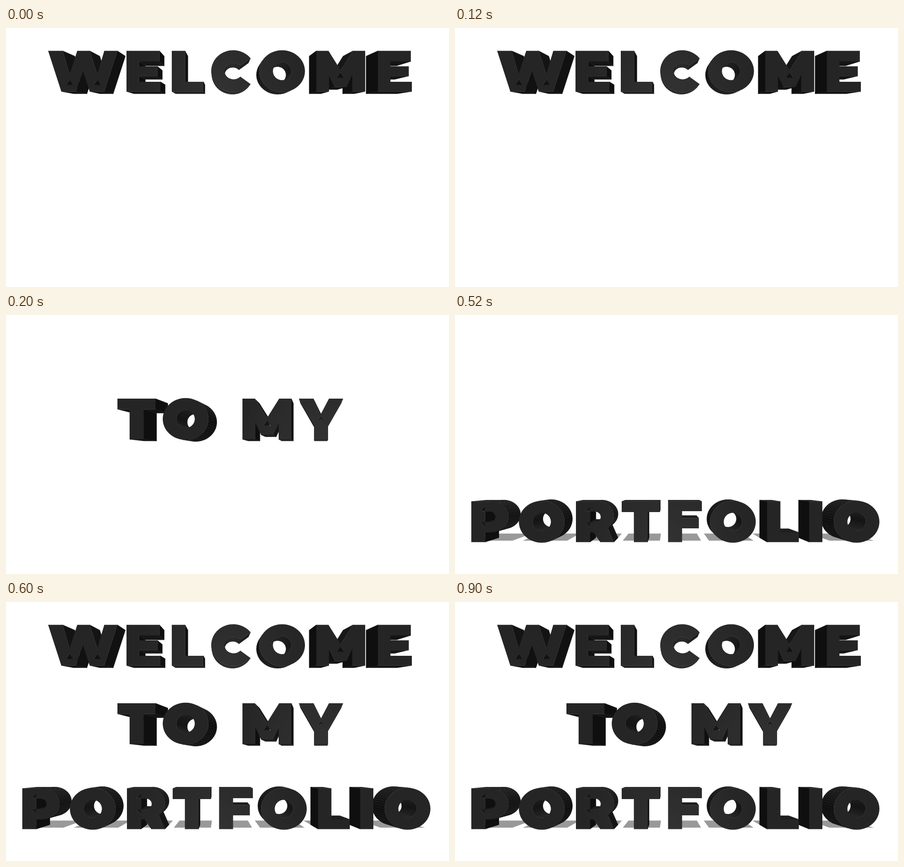
Recreate the animation shown at these times as an HTML page with a canvas. Size 978x573 px, loop 1.1 s.

```html
<!DOCTYPE html>
<html>
<head>
<meta charset="utf-8">
<title>Welcome to my portfolio</title>
<style>
html, body { margin: 0; height: 100%; overflow: hidden; background: #fff; }
canvas { display: block; }
</style>
</head>
<body>
<canvas id="stage" width="978" height="573"></canvas>
<script>
const ctx = document.getElementById('stage').getContext('2d');
const SIZE = 90;       // cap height
const DEPTH = 0.076;   // how far the backs shrink toward the vanishing point
const SHADOW = 0.147;  // how far the floor shadows reach
const SPACE = 50;

// Points along an ellipse, angles in degrees
function arc(cx, cy, rx, ry, from, to, steps = 48) {
  return Array.from({ length: steps + 1 }, (_, i) => {
    const a = (from + (to - from) * i / steps) * Math.PI / 180;
    return [cx + rx * Math.cos(a), cy + ry * Math.sin(a)];
  });
}
const pts = text => text.split(' ').map(p => p.split(',').map(Number));

// Left bearing, width, right bearing, then outlines in a 100 x 100 box:
// outer rings clockwise, holes reversed
const glyph = (left, width, right, ...rings) => ({ left, width, right, rings });
const bowlHoles = [
  [...pts('37,25 37,51'), ...arc(50, 38, 15, 13, 90, -90)],
  pts('37,11 24,23 37,25'),
  pts('37,51 24,52 37,64')
];
const glyphs = {
  W: glyph(6, 153, 6, pts('0,0 21,0 31,58 42,0 60,0 71,58 81,0 100,0 81,100 60,100 50,48 40,100 19,100'),
    pts('31,71 26,84 36,84'), pts('71,71 66,84 76,84')),
  E: glyph(14, 75, 11, pts('0,0 97,0 97,26 37,26 37,38 91,38 91,62 37,62 37,76 100,76 100,100 0,100')),
  L: glyph(14, 70, 9, pts('0,0 42,0 42,76 100,76 100,100 0,100')),
  C: glyph(8, 90, 5, [...arc(54, 50, 54, 51.5, 38, 322), ...arc(55, 50, 22, 20, 318, 42)]),
  O: glyph(11, 101, 11, arc(50, 50, 50, 51.5, 0, 360), arc(50, 50, 20, 22, 360, 0)),
  M: glyph(14, 108, 14, pts('0,0 25,0 50,48 75,0 100,0 100,100 74,100 74,58 62,89 38,89 26,58 26,100 0,100'),
    pts('50,53 43,66 57,66')),
  T: glyph(7, 84, 5, pts('0,0 100,0 100,26 68,26 68,100 32,100 32,26 0,26')),
  Y: glyph(3, 97, 3, pts('0,0 33,0 50,37 68,0 100,0 66,64 66,100 34,100 34,64'),
    pts('50,42 44,52 56,52')),
  P: glyph(14, 82, 12, [[0, 0], ...arc(52, 38, 48, 38, -90, 90), ...pts('37,76 37,100 0,100')], ...bowlHoles),
  R: glyph(14, 84, 10, [[0, 0], ...arc(54, 37, 46, 37, -90, 50),
    ...pts('100,100 64,100 46,76 37,76 37,100 0,100')], ...bowlHoles),
  F: glyph(14, 74, 7, pts('0,0 100,0 100,24 41,24 41,41 91,41 91,66 41,66 41,100 0,100')),
  I: glyph(14, 29, 14, pts('0,0 100,0 100,100 0,100'))
};

const rows = [
  { text: 'WELCOME', x: 93, top: 50.5, vanish: [478, 205] },
  { text: 'TO MY', x: 246, top: 224, vanish: [690, 362], lift: 39 },
  { text: 'PORTFOLIO', x: 36, top: 412.5, vanish: [470, 373], floor: true }
];

// Sets a line of text from the bearings, its first glyph touching x
function layout({ text, x }) {
  let pen = x - glyphs[text[0]].left;
  const letters = [];
  for (const char of text) {
    if (char === ' ') { pen += SPACE; continue; }
    const { left, width, right, rings } = glyphs[char];
    letters.push({ rings, x: pen + left, width });
    pen += left + width + right;
  }
  return letters;
}

// Moves a point away from the viewer
const recede = ([x, y], [vx, vy], depth) => [x + (vx - x) * depth, y + (vy - y) * depth];
const mix = (a, b) => [(a[0] + b[0]) / 2, (a[1] + b[1]) / 2];

function fill(rings, color, seam) {
  ctx.beginPath();
  for (const ring of rings) {
    ring.forEach(([x, y], i) => i ? ctx.lineTo(x, y) : ctx.moveTo(x, y));
    ctx.closePath();
  }
  ctx.fillStyle = ctx.strokeStyle = color;
  ctx.fill('evenodd');
  if (seam) {
    ctx.lineWidth = 0.5;
    ctx.stroke();
  }
}

function drawLetter({ rings, x, width }, { top, vanish }, face) {
  const fronts = rings.map(ring => ring.map(p => [x + width * p[0] / 100, top + SIZE * p[1] / 100]));
  const centre = [x + width / 2, top + SIZE / 2];
  const away = [vanish[0] - centre[0], vanish[1] - centre[1]];
  const walls = [];
  for (const ring of fronts) ring.forEach((a, i) => {
    const b = ring[(i + 1) % ring.length];
    const ex = b[0] - a[0], ey = b[1] - a[1], len = Math.hypot(ex, ey);
    const mid = mix(a, b);
    const toX = vanish[0] - mid[0], toY = vanish[1] - mid[1];
    if (len < 0.01 || ey * toX - ex * toY <= 0) return;
    // Level walls catch more light, most of all near the lamp
    const up = ex / len;
    const glow = Math.max(0, 1 - Math.hypot(toX, top + SIZE - mid[1]) / 190);
    const tone = Math.round(15 + Math.abs(up) * (up > 0 ? 15 : 5 + 24 * glow));
    walls.push({
      quad: [a, b, recede(b, vanish, DEPTH), recede(a, vanish, DEPTH)],
      color: `rgb(${tone},${tone},${tone})`,
      order: mid[0] * away[0] + mid[1] * away[1]
    });
  });
  walls.sort((p, q) => p.order - q.order);
  for (const { quad, color } of walls) fill([quad], color, true);
  fill(fronts, face);
}

function drawShadow({ x, width }, { top, vanish }) {
  const y = top + SIZE;
  const foot = (px, depth) => recede([px, y], vanish, depth);
  fill([[foot(x, 0.025), foot(x + width, 0.025), foot(x + width, SHADOW), foot(x, SHADOW)]], '#999');
}

function drawRow(row) {
  const { top, vanish: [vx] } = row;
  const face = ctx.createRadialGradient(vx, top + SIZE, 0, vx, top + SIZE, 190);
  face.addColorStop(0, '#323232');
  face.addColorStop(1, '#252525');
  // Letters nearer the vanishing point cover the outer ones
  const spread = l => Math.abs(l.x + l.width / 2 - vx);
  const letters = layout(row).sort((a, b) => spread(b) - spread(a));
  if (row.floor) letters.forEach(l => drawShadow(l, row));
  letters.forEach(l => drawLetter(l, row, face));
}

// Each line alone for 200 ms, then all of them together
function draw(time) {
  const step = Math.floor(time % 1100 / 200);
  ctx.clearRect(0, 0, 978, 573);
  if (step >= rows.length) return rows.forEach(drawRow);
  const row = rows[step];
  ctx.save();
  ctx.translate(0, -(row.lift || 0));
  drawRow(row);
  ctx.restore();
}

const start = performance.now();
function tick() {
  draw(performance.now() - start);
  requestAnimationFrame(tick);
}
tick();
</script>
</body>
</html>
```
